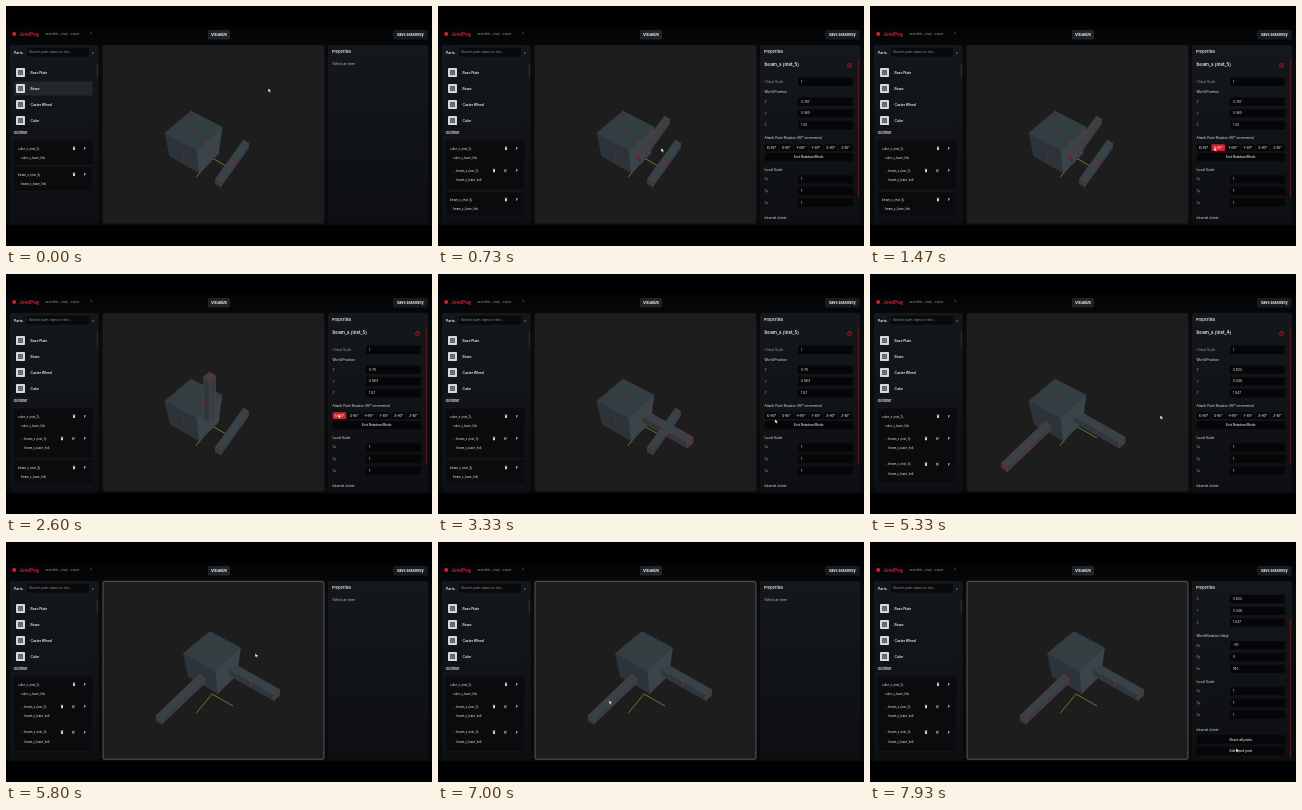
Recreate the animation shown at these times as an HTML page. Size 426 by 240 pixels, loop 8000 ms.

```html
<!DOCTYPE html>
<html lang="en">
<head>
<meta charset="utf-8">
<title>Assembly editor</title>
<style>
html, body { margin: 0; width: 100%; height: 100%; overflow: hidden; background: #000; }
svg { display: block; width: 100vw; height: 100vh; font-family: Inter, sans-serif; }
</style>
</head>
<body>
<svg id="stage" viewBox="0 0 426 240">
  <defs>
    <linearGradient id="app" x2="0" y2="1"><stop stop-color="#030405"/><stop offset=".2" stop-color="#090b0d"/><stop offset="1" stop-color="#07090b"/></linearGradient>
    <linearGradient id="panel" x2="0" y2="1"><stop stop-color="#15181b"/><stop offset="1" stop-color="#0d0f12"/></linearGradient>
    <clipPath id="partsClip"><path d="M5 55H93V119H5Z"/></clipPath>
    <clipPath id="propsClip"><path d="M323 50H422V216.5H323Z"/></clipPath>
    <clipPath id="viewClip"><path d="M97 40H318V217H97Z"/></clipPath>
  </defs>
  <g id="scene"></g>
</svg>
<script>
const LOOP = 8000;
const RED = '#d51f2c', WHITE = '#e8eaec', GREY = '#92979b';
const scene = document.getElementById('scene');

// Event times in ms
const ATTACH_5 = 430, TURN_UP = 2330, TURN_OUT = 3070, SELECT_4 = 3670,
  ATTACH_4 = 4400, TURN_4 = 4930, DESELECT = 5430, PAN = [5530, 5770],
  RESELECT = 7070, SCROLL = [7330, 7600];

// Pointer keys: time, x, y
const pointerKeys = [
  [0, 263, 84], [400, 205, 144], [560, 205, 144], [1300, 345, 143], [1900, 345, 143],
  [2250, 333, 142], [2670, 333, 142], [2980, 392, 142], [3150, 392, 142],
  [3620, 228, 157], [3750, 228, 157], [4150, 172, 159], [4450, 172, 159],
  [4850, 392, 142], [5000, 392, 142], [5330, 291, 143], [5500, 231, 129],
  [5770, 250, 113], [6150, 250, 113], [6900, 172, 160], [7130, 172, 160],
  [7400, 372, 165], [7600, 372, 175], [7850, 367, 208], [8000, 367, 208]
];

const ramp = (t, [a, b]) => {
  const k = Math.min(1, Math.max(0, (t - a) / (b - a)));
  return k * k * (3 - 2 * k);
};

function pointerAt(t) {
  const i = pointerKeys.findIndex(key => key[0] > t);
  const [t0, x0, y0] = pointerKeys[i - 1], [t1, x1, y1] = pointerKeys[i];
  const k = ramp(t, [t0, t1]);
  return [x0 + (x1 - x0) * k, y0 + (y1 - y0) * k];
}

const rect = (x, y, w, h, fill, r = 1.5, stroke = 'none') =>
  `<rect x="${x}" y="${y}" width="${w}" height="${h}" rx="${r}" fill="${fill}" stroke="${stroke}" stroke-width=".4"/>`;

// y is the vertical middle of the line
const text = (s, x, y, size = 3.3, fill = WHITE, weight = 400, anchor = 'start') =>
  `<text x="${x}" y="${y + size * .36}" font-size="${size}" fill="${fill}" font-weight="${weight}" text-anchor="${anchor}">${s}</text>`;

const path = (d, stroke, width = .6, fill = 'none') =>
  `<path d="${d}" stroke="${stroke}" stroke-width="${width}" fill="${fill}" stroke-linejoin="round"/>`;

const face = (points, fill, edge) => path('M' + points.join('L') + 'Z', edge, .5, fill);
const mark = ([x, y]) => `<circle cx="${x}" cy="${y}" r=".9" fill="#a51b28"/>`;
const button = (label, x, y, w, h, fill = '#050607') =>
  rect(x, y, w, h, fill) + text(label, x + w / 2, y + h / 2, 3.3, WHITE, 500, 'middle');

function header() {
  return `<circle cx="8.2" cy="28" r="2" fill="${RED}"/>` +
    text('JointPeg', 13, 28, 4.6, RED, 700) +
    text('assemble • snap • export', 39.5, 28.2, 2.8, GREY) +
    text('?', 85, 27.7, 4, RED, 600, 'middle') +
    rect(202, 24, 22, 9.5, '#202326') + text('Visualize', 213, 28.6, 3.7, '#fff', 600, 'middle') +
    rect(387, 24, 34.5, 9.5, '#181b1e') + text('Save assembly', 404.3, 28.6, 3.7, '#fff', 600, 'middle');
}

function partsList(hovered) {
  const rows = ['Base Plate', 'Beam', 'Caster Wheel', 'Cube'].map((name, i) => {
    const y = 66.5 + i * 16;
    return rect(8, y - 7, 78.5, 14, hovered === i ? '#22282a' : '#131619') +
      rect(10, y - 4.6, 9, 9.2, '#d7d9da', .8) + rect(12, y - 2.5, 5, 5, '#555b60', .6) +
      path(`M12.5 ${y - .6}h4M12.5 ${y + 1}h4`, '#b5b9bc', .4) +
      text(name, 24.5, y, 3.3, WHITE, 600);
  }).join('');
  return rect(4, 39, 88.5, 178.5, 'url(#panel)', 2) +
    text('Parts', 8, 46.7, 3.5, WHITE, 600) +
    rect(21, 41.7, 62, 9, '#080a0c') + text('Search parts name or des...', 23, 46.2, 3.3, GREY) +
    text('×', 87, 46.3, 4, GREY, 400, 'middle') +
    `<g clip-path="url(#partsClip)">${rows}</g>` +
    rect(90.8, 58, .9, 14, '#78151d', .4) + path('M91.2 72V119', '#30161a', .5) +
    text('Outliner', 7.5, 127, 3.7, WHITE, 600);
}

function rowIcons(y, linked) {
  const bin = linked ? 56 : 68;
  return rect(bin - .9, y - 1.2, 1.8, 2.8, WHITE, .3) + path(`M${bin - 1.3} ${y - 1.5}h2.6`, WHITE, .5) +
    (linked ? path(`M66 ${y + 1}l2.6-2.3M65.8 ${y - .2}l1.2-1.1M67.4 ${y + 1.2}l1.2-1.1`, WHITE, .7) : '') +
    text('F', 79, y, 3.5, WHITE, 600, 'middle');
}

function outliner(t) {
  const node = (kind, id, y, child) =>
    text(`${child ? '- ' : ''}${kind}_s (inst_${id})`, child ? 16 : 12, y, 3.05) +
    text(`${kind}_s_base_link`, child ? 18.5 : 15, y + 9.7, 2.95) + rowIcons(y, child);
  const box = (y, h) => rect(7.5, y, 79.5, h, '#090b0d', 1.5, '#1b1e21');
  if (t < ATTACH_5)
    return box(134, 25) + node('cube', 3, 142.5) + box(160.5, 24.5) + node('beam', 4, 168.5);
  const root = node('cube', 3, 142.5) + node('beam', 5, 164.7, true);
  return t < ATTACH_4
    ? box(134, 50) + root + box(185.5, 24.5) + node('beam', 4, 193.7)
    : box(134, 75.5) + root + node('beam', 4, 190.3, true);
}

function field(label, value, y) {
  return text(label, 326.5, y, 3.2, GREY) +
    rect(360, y - 4.3, 55, 8.6, '#050607', 1.2, '#111417') + text(value, 363, y - .2, 3.3);
}

const fields = (labels, values, y) => labels.map((label, i) => field(label, values[i], y + i * 11.7)).join('');

function properties(t, [px, py]) {
  const frame = rect(322, 39, 100, 178.5, 'url(#panel)', 2) + text('Properties', 326, 45.2, 3.8, WHITE, 600);
  const empty = t < ATTACH_5 || (t >= DESELECT && t < RESELECT);
  if (empty) return frame + text('Select an item', 326.5, 57.5, 3.35, '#c0c4c7');

  const id = t < SELECT_4 ? 5 : 4;
  const turning = t < SELECT_4 || (t >= ATTACH_4 && t < DESELECT);
  const position = t < TURN_UP ? ['0.767', '0.565', '1.55']
    : t < SELECT_4 ? ['0.79', '0.563', '1.57']
    : t < ATTACH_4 ? ['0.787', '0.583', '1.547'] : ['0.822', '0.546', '1.547'];
  const rotation = t < ATTACH_4 ? ['90', '0', '0'] : ['-90', '0', '180'];
  const scroll = 38.6 * ramp(t, SCROLL);

  let body = text(`beam_s (inst_${id})`, 326.5, 58.5, 4.6, WHITE, 600) +
    `<circle cx="411.5" cy="59.5" r="2.1" fill="#2a0c10" stroke="${RED}" stroke-width=".6"/>` +
    path('M410.7 58.7l1.6 1.6m0-1.6l-1.6 1.6', RED, .5) +
    field('Global Scale', '1', 75.7) + text('World Position', 326.5, 86, 3.3) +
    fields(['X', 'Y', 'Z'], position, 95.7);
  let scaleY = 178;
  if (turning) {
    scaleY = 163.5;
    body += text('Attach Point Rotation (90° increments)', 326.5, 132, 3.2);
    ['X+90°', 'X-90°', 'Y+90°', 'Y-90°', 'Z+90°', 'Z-90°'].forEach((label, i) => {
      const x = 326.7 + i * 14.8;
      const over = px >= x && px < x + 13.5 && py > 138 && py < 145.5;
      body += rect(x, 138.3, 13.5, 6.8, over ? RED : '#050607', 1.2) +
        text(label, x + 6.75, 141.6, 3, WHITE, 500, 'middle');
    });
    body += button('Exit Rotation Mode', 326.5, 147, 88.5, 8.2);
  } else {
    body += text('World Rotation (deg)', 326.5, 132, 3.3) + fields(['Rx', 'Ry', 'Rz'], rotation, 142);
  }
  body += text('Local Scale', 326.5, scaleY, 3.3) + fields(['Sx', 'Sy', 'Sz'], [1, 1, 1], scaleY + 9.8) +
    text('Internal Joints', 326.5, scaleY + 48.5, 3.3) +
    button('Reset all joints', 326.5, scaleY + 53.7, 88.5, 8.6) +
    button('Edit bend joint', 326.5, scaleY + 65.5, 88.5, 8.6);
  return frame + `<g clip-path="url(#propsClip)"><g transform="translate(0 ${-scroll})">${body}</g></g>` +
    rect(420.2, 53 + scroll * .62, .8, 138, '#721720', .4);
}

// A slanted box with three visible faces, spanned by u, v and d from its lower left corner
function beam(p, u, v, d, selected) {
  const at = (a, b, c) => [0, 1].map(i => p[i] + u[i] * a + v[i] * b + d[i] * c);
  const edge = selected ? '#7d353c' : '#434c51';
  return face([at(0, 0, 0), at(1, 0, 0), at(1, 1, 0), at(0, 1, 0)], '#30373b', edge) +
    face([at(1, 0, 0), at(1, 0, 1), at(1, 1, 1), at(1, 1, 0)], '#363e43', edge) +
    face([at(0, 1, 0), at(1, 1, 0), at(1, 1, 1), at(0, 1, 1)], '#394247', edge) +
    [[.5, 1, .5], [1, .5, .5], [.5, .5, 0]].map(k => mark(at(...k))).join('');
}

function cube() {
  const [back, left, front, right] = [[185, 105], [159, 127], [191, 144], [216, 121]];
  const [lowLeft, lowFront, lowRight] = [[164, 150], [193.5, 167], [212.5, 148]];
  return face([left, front, lowFront, lowLeft], '#2d3439', '#343c41') +
    face([front, right, lowRight, lowFront], '#3b4449', '#414a4f') +
    face([back, right, front, left], '#343d42', '#3a4348') +
    [[188, 122.5], [177.5, 148], [205, 144]].map(mark).join('');
}

function viewport(t) {
  const pan = ramp(t, PAN);
  const selected5 = t >= ATTACH_5 && t < SELECT_4;
  const selected4 = (t >= SELECT_4 && t < DESELECT) || t >= RESELECT;
  const alongX = (x, y, selected) => beam([x, y], [5, 3], [0, -5], [28, -39], selected);

  let beam5 = '';
  if (t >= TURN_OUT) beam5 = beam([203.5, 148], [46, 26], [0, -6], [5.5, -5], selected5);
  else if (t >= TURN_UP) beam5 = beam([197.5, 145], [6, 4], [0, -42], [6, -5], selected5);
  else if (t >= ATTACH_5) beam5 = alongX(198.5, 154, selected5);

  let beam4 = alongX(209.5, 178, selected4);
  if (t >= TURN_4) beam4 = beam([131.5, 194], [6, 3.5], [0, -5], [43, -41], selected4);
  else if (t >= ATTACH_4) beam4 = beam([173, 155], [5, 3], [0, -38], [6, -5], selected4);

  const focused = t >= PAN[0];
  return rect(97, 39.3, 221, 178, '#1d1d1e', 1.5, focused ? '#b9bbbc' : '#25282a') +
    `<g clip-path="url(#viewClip)">` +
    path('M206 152L227 164', '#6f9c25', .8) + path('M206 152L190 171.5', '#9a8728', .8) +
    `<g transform="translate(${18.5 * pan} ${-15.5 * pan})">${cube()}${beam5}${beam4}</g></g>`;
}

const pointer = ([x, y]) =>
  path(`M${x - .8} ${y - 1.5}v3.5l.9-.8.8 1.4.7-.4-.7-1.3h1.3Z`, '#222', .2, '#fff');

function draw(t) {
  const p = pointerAt(t);
  const row = p[0] < 88 ? Math.floor((p[1] - 58.5) / 16) : t < ATTACH_5 ? 1 : -1;
  scene.innerHTML = rect(0, 20, 426, 199.5, 'url(#app)', 0) + header() + partsList(row) +
    outliner(t) + viewport(t) + properties(t, p) + pointer(p);
}

const start = performance.now();
function tick() {
  draw((performance.now() - start) % LOOP);
  requestAnimationFrame(tick);
}
tick();
</script>
</body>
</html>
```
